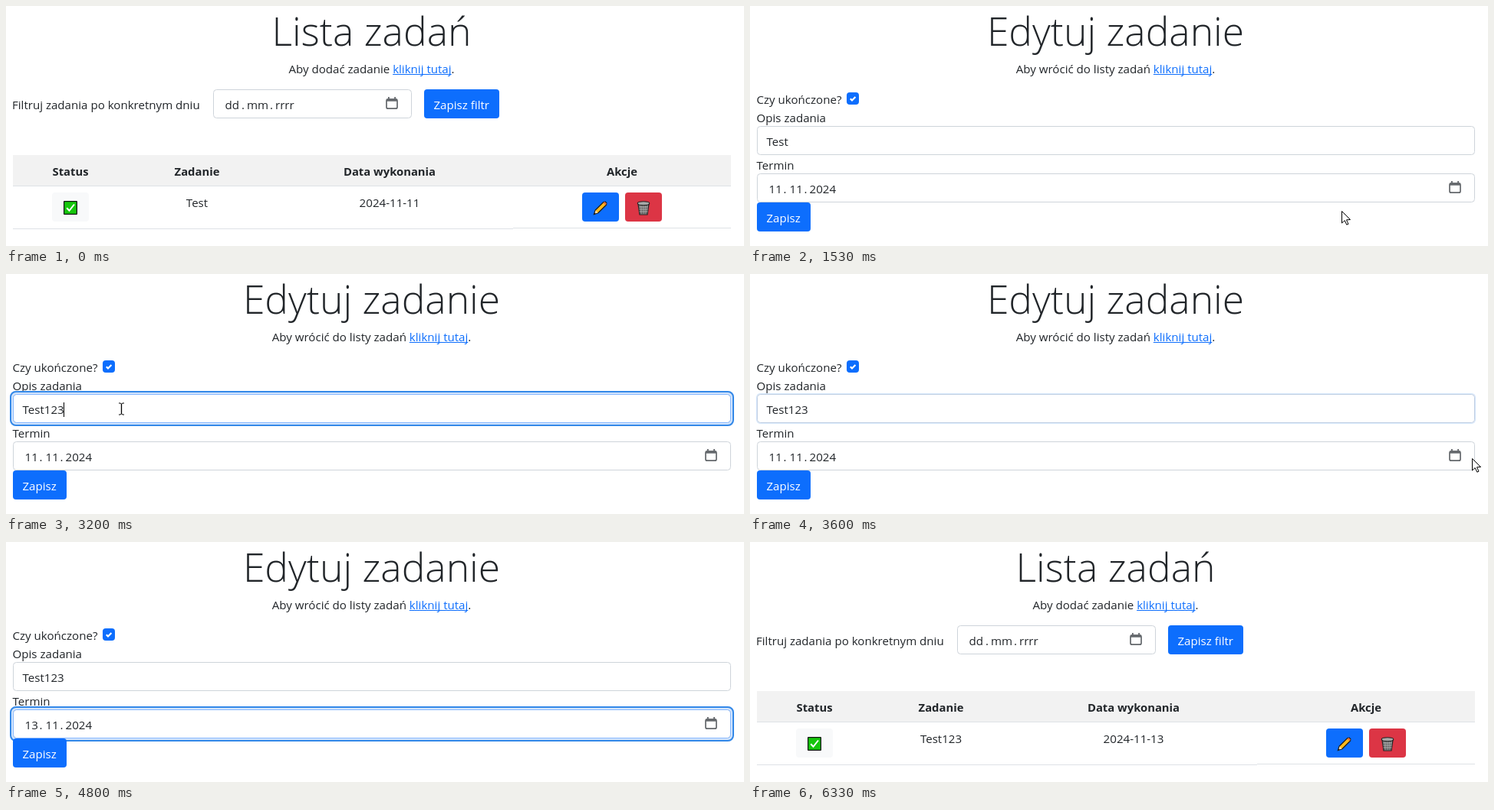
Write an HTML page with a canvas that moves like this. It is 962 px wide and 314 px high and loops after 8.54 s.

```html
<!DOCTYPE html>
<html lang="pl">
<head>
<meta charset="utf-8">
<title>Lista zadań</title>
<style>
html, body { margin: 0; width: 100%; height: 100%; overflow: hidden; background: #fff; }
canvas { display: block; }
</style>
</head>
<body>
<canvas id="stage" width="962" height="314"></canvas>
<script>
const ctx = document.getElementById('stage').getContext('2d');
const LOOP = 8540, FPS = 15;
const INK = '#212529', BLUE = '#0d6efd', DARK_BLUE = '#0b5ed7', EDGE = '#ced4da';
const FAMILY = '"Open Sans", "Noto Sans", sans-serif';
const BODY = `15.1px ${FAMILY}`, BOLD = `bold 14.8px ${FAMILY}`, TITLE = `300 51.6px ${FAMILY}`;

const clamp = v => Math.max(0, Math.min(1, v));
const ease = v => v * v * (3 - 2 * v);

function text(str, x, y, { font = BODY, color = INK, align = 'left' } = {}) {
  ctx.font = font;
  ctx.fillStyle = color;
  ctx.textAlign = align;
  ctx.fillText(str, x, y);
}

function textWidth(str) {
  ctx.font = BODY;
  return ctx.measureText(str).width;
}

function box(x, y, w, h, fill, radius = 4) {
  ctx.beginPath();
  ctx.roundRect(x, y, w, h, radius);
  ctx.fillStyle = fill;
  ctx.fill();
}

function outline(x, y, w, h, color, radius = 4, width = 1) {
  ctx.beginPath();
  ctx.roundRect(x, y, w, h, radius);
  ctx.strokeStyle = color;
  ctx.lineWidth = width;
  ctx.stroke();
}

function path(points, { fill, stroke, width = 1, close = false }) {
  ctx.beginPath();
  points.forEach(([x, y]) => ctx.lineTo(x, y));
  if (close) ctx.closePath();
  if (fill) { ctx.fillStyle = fill; ctx.fill(); }
  if (stroke) { ctx.strokeStyle = stroke; ctx.lineWidth = width; ctx.stroke(); }
}

function at(x, y, draw) {
  ctx.save();
  ctx.translate(x, y);
  draw();
  ctx.restore();
}

function field(x, y, w, focus = 0) {
  const h = 38;
  if (focus > 0) {
    const d = 4 * focus;
    ctx.globalAlpha = focus;
    box(x - d, y - d, w + 2 * d, h + 2 * d, '#d3e5fc', 4 + d);
    outline(x - d + 1, y - d + 1, w + 2 * d - 2, h + 2 * d - 2, '#3388e8', 3 + d, 2);
    ctx.globalAlpha = 1;
  }
  box(x, y, w, h, '#fff');
  outline(x + .5, y + .5, w - 1, h - 1, EDGE);
  if (focus > 0) {
    ctx.globalAlpha = focus;
    outline(x + .5, y + .5, w - 1, h - 1, '#86b7fe');
    ctx.globalAlpha = 1;
  }
}

function dateParts(parts, xs, y) {
  text(parts[0], xs[0], y);
  text('.', xs[1], y);
  text(parts[1], xs[2], y);
  text('.', xs[3], y);
  text(parts[2], xs[4], y);
}

function calendarIcon(x, y, color) {
  at(x, y, () => {
    outline(1, 3, 14, 12.2, color, 2, 1.7);
    ctx.fillStyle = color;
    ctx.fillRect(1, 2.5, 14, 3.2);
    ctx.fillRect(3, 0, 1.8, 3);
    ctx.fillRect(11.2, 0, 1.8, 3);
  });
}

function heading(title, intro) {
  const link = 'kliknij tutaj', middle = 476.5;
  text(title, middle, 52, { font: TITLE, align: 'center' });
  const linkWidth = textWidth(link);
  const left = middle - textWidth(`${intro} ${link}.`) / 2;
  const linkX = left + textWidth(intro + ' ');
  text(intro, left, 88);
  text('.', linkX + linkWidth, 88);
  text(link, linkX, 88, { color: BLUE });
  ctx.fillRect(linkX, 89, linkWidth, 1);
}

function checkEmoji() {
  box(75, 255, 18, 18, '#111', 1);
  box(76.2, 256.2, 15.6, 15.6, '#16c60c', 0);
  path([[79.2, 264.2], [82.5, 267.8], [89, 259.5]], { stroke: '#fff', width: 2 });
}

function pencilEmoji() {
  at(766.5, 272.5, () => {
    ctx.rotate(-Math.PI / 4);
    path([[0, 0], [5, -2.6], [20, -2.6], [22, -1], [22, 1], [20, 2.6], [5, 2.6]],
      { fill: '#fdb91b', stroke: '#1b1b1b', width: 1.3, close: true });
    path([[1, 0], [5, -2], [5, 2]], { fill: '#f7dfb5', close: true });
    path([[0, 0], [2.2, -1.1], [2.2, 1.1]], { fill: '#1b1b1b', close: true });
    ctx.fillStyle = '#e8703a';
    ctx.fillRect(19, -2, 2.3, 4);
  });
}

function binEmoji() {
  at(822, 255, () => {
    path([[2, 4], [16, 4], [14, 18], [4, 18]], { fill: '#8a8a8a', stroke: '#222', width: 1.2, close: true });
    for (let i = 0; i < 4; i++) {
      path([[4 + i * 3, 5], [5.2 + i * 2.4, 17]], { stroke: '#444', width: .8 });
    }
    for (let y = 8; y < 17; y += 3) path([[3.5, y], [14.5, y]], { stroke: '#bbb', width: .8 });
    ctx.beginPath();
    ctx.ellipse(9, 3.2, 7.8, 2.5, 0, 0, Math.PI * 2);
    ctx.fillStyle = '#a8a8a8';
    ctx.fill();
    ctx.strokeStyle = '#222';
    ctx.lineWidth = 1.1;
    ctx.stroke();
  });
}

function listPage(task, date, hover) {
  heading('Lista zadań', 'Aby dodać zadanie');
  text('Filtruj zadania po konkretnym dniu', 8, 135);
  field(270, 109, 259);
  dateParts(['dd', 'mm', 'rrrr'], [285.5, 307, 314, 344, 351], 135);
  calendarIcon(495, 119, '#63676b');
  box(545, 109, 98, 38, BLUE);
  text('Zapisz filtr', 557.5, 135, { color: '#fff' });

  ctx.fillStyle = '#f2f2f2';
  ctx.fillRect(9, 195, 936, 40);
  ctx.fillStyle = '#dee2e6';
  ctx.fillRect(9, 235, 936, 1);
  ctx.fillRect(9, 291, 652, 1);
  ctx.fillRect(661, 290, 284, 1);

  [['Status', 84], ['Zadanie', 249], ['Data wykonania', 500], ['Akcje', 803]]
    .forEach(([label, x]) => text(label, x, 222, { font: BOLD, align: 'center' }));
  text(task, 249, 263, { align: 'center' });
  text(date, 500, 263, { align: 'center' });

  box(60, 244, 48, 38, '#f8f9fa');
  checkEmoji();
  box(751, 244, 48, 38, hover ? DARK_BLUE : BLUE);
  pencilEmoji();
  box(807, 244, 48, 38, '#dc3545');
  binEmoji();
}

function datePicker(alpha) {
  ctx.globalAlpha = alpha;
  outline(9, 258, 274, 80, 'rgba(0,0,0,.3)', 3, 1.5);
  box(9, 258, 274, 80, '#2b2b2e', 3);
  ctx.globalAlpha = clamp(alpha + .15);
  path([[45, 284], [39.5, 290], [45, 296]], { stroke: '#b5b5b8' });
  path([[247, 284], [252.5, 290], [247, 296]], { stroke: '#b5b5b8' });
  outline(88.5, 278.5, 115, 23, '#c4c4c6', 2);
  text('listopad 2024', 101, 295, { font: `12.2px ${FAMILY}`, color: '#fff' });
  path([[185, 287.5], [190.5, 293], [196, 287.5]], { stroke: '#d0d0d2' });
  ctx.globalAlpha = 1;
}

function editPage({ task, day, taskFocus, dateFocus, caret, iconHover, popup, button, buttonRing }) {
  heading('Edytuj zadanie', 'Aby wrócić do listy zadań');
  text('Czy ukończone?', 8.5, 128);
  box(126, 113, 16, 16, BLUE);
  path([[130.8, 121.2], [133, 123.5], [137.4, 119]], { stroke: '#fff', width: 2.2 });
  text('Opis zadania', 8.5, 152);
  text('Termin', 8.5, 214);
  field(9, 157, 936, taskFocus);
  text(task, 21.5, 183);
  if (caret) {
    ctx.fillStyle = '#000';
    ctx.fillRect(Math.floor(21.5 + textWidth(task)), 168, 1, 19);
  }
  field(9, 219, 936, dateFocus);
  dateParts([day, '11', '2024'], [24.5, 43.5, 51.5, 70.5, 77.5], 245);
  calendarIcon(911, 229, iconHover ? '#111' : '#63676b');
  if (buttonRing) box(5, 253, 78, 46, '#9ec5fe', 8);
  box(9, 257, 70, 38, button);
  text('Zapisz', 21.5, 283, { color: '#fff' });
  if (popup) datePicker(popup);
}

const pointers = {
  arrow() {
    path([[.5, .5], [.5, 16], [4.2, 12.6], [6.8, 18.2], [9, 17.2], [6.5, 11.8], [11.5, 11.5]],
      { fill: '#fff', stroke: '#000', close: true });
  },
  beam() {
    path([[-3, -7], [-1, -7], [.5, -6], [2, -7], [4, -7]], { stroke: '#000' });
    path([[.5, -6], [.5, 7]], { stroke: '#000', width: 1.3 });
    path([[-3, 8], [-1, 8], [.5, 7], [2, 8], [4, 8]], { stroke: '#000' });
  },
  hand() {
    ctx.beginPath();
    ctx.moveTo(-1.5, 13);
    ctx.lineTo(-1.5, 2.5);
    ctx.quadraticCurveTo(0, -.5, 1.5, 2.5);
    ctx.lineTo(1.5, 7.5);
    for (let x = 1.5; x < 9; x += 3) ctx.quadraticCurveTo(x + 1.5, 5.5 + x / 4, x + 3, 8.5 + x / 5);
    ctx.lineTo(10.5, 15);
    ctx.quadraticCurveTo(10, 18, 8.5, 19.5);
    ctx.lineTo(8.5, 22.5);
    ctx.lineTo(0, 22.5);
    ctx.quadraticCurveTo(-1, 19, -5, 14);
    ctx.quadraticCurveTo(-6, 10, -1.5, 13);
    ctx.fillStyle = '#fff';
    ctx.fill();
    ctx.strokeStyle = '#000';
    ctx.lineWidth = 1.1;
    ctx.lineJoin = 'round';
    ctx.stroke();
    for (let x = 1.5; x < 9; x += 3) path([[x, 8], [x, 12]], { stroke: '#000' });
  }
};

// tick, x, y, pointer shown from this tick on
const track = [
  [14, 796, 306, 'arrow'], [16, 784, 278, 'hand'], [19, 775, 265, 'hand'],
  [23, 771, 268, 'arrow'], [29, 771, 268, 'arrow'], [37, 110, 169, 'beam'],
  [47, 110, 169, 'beam'], [48, 150, 176, 'beam'], [49, 280, 199, 'arrow'],
  [53, 946, 243, 'arrow'], [54, 941, 241, 'arrow'], [55, 939, 241, 'arrow'],
  [58, 920, 244, 'arrow'], [59, 920, 244, 'arrow'], [64, 480, 320, ''],
  [80, 66, 304, 'arrow'], [81, 61, 293, 'hand'], [84, 52, 276, 'hand'],
  [89, 52, 276, 'hand'], [92, 53, 286, 'arrow'], [95, 53, 288, '']
];

function pointer(tick) {
  const i = track.findLastIndex(key => key[0] <= tick);
  if (i < 0 || !track[i][3]) return;
  const [t0, x0, y0, shape] = track[i], [t1, x1, y1] = track[i + 1];
  const k = ease((tick - t0) / (t1 - t0));
  at(Math.round(x0 + (x1 - x0) * k), Math.round(y0 + (y1 - y0) * k), pointers[shape]);
}

// Focus fades in and out over 150 ms, about 2.25 ticks
const focus = (tick, on, off) => ease(clamp((tick - on) / 2.25)) * (1 - ease(clamp((tick - off) / 2.25)));

function render(ms) {
  const tick = Math.floor((ms + 5) * FPS / 1000);
  ctx.fillStyle = '#fff';
  ctx.fillRect(0, 0, 962, 314);
  if (tick < 22) {
    listPage('Test', '2024-11-11', tick >= 16);
  } else if (tick >= 92) {
    listPage('Test123', '2024-11-13', false);
  } else {
    const typed = tick < 43 ? 0 : Math.min(3, Math.floor((tick - 41) / 2));
    editPage({
      task: 'Test' + '123'.slice(0, typed),
      day: tick < 72 ? '11' : '13',
      taskFocus: focus(tick, 37.9, 52.4),
      dateFocus: focus(tick, 56.5, 88),
      caret: tick >= 38 && tick < 52,
      iconHover: tick >= 57 && tick < 61,
      popup: tick < 72 ? clamp((tick - 58) * .75) : 0,
      button: tick < 81 ? BLUE : tick < 88 ? DARK_BLUE : '#0a58ca',
      buttonRing: tick >= 89
    });
  }
  pointer(tick);
}

const start = performance.now();
function loop() {
  render((performance.now() - start) % LOOP);
  requestAnimationFrame(loop);
}
loop();
</script>
</body>
</html>
```
